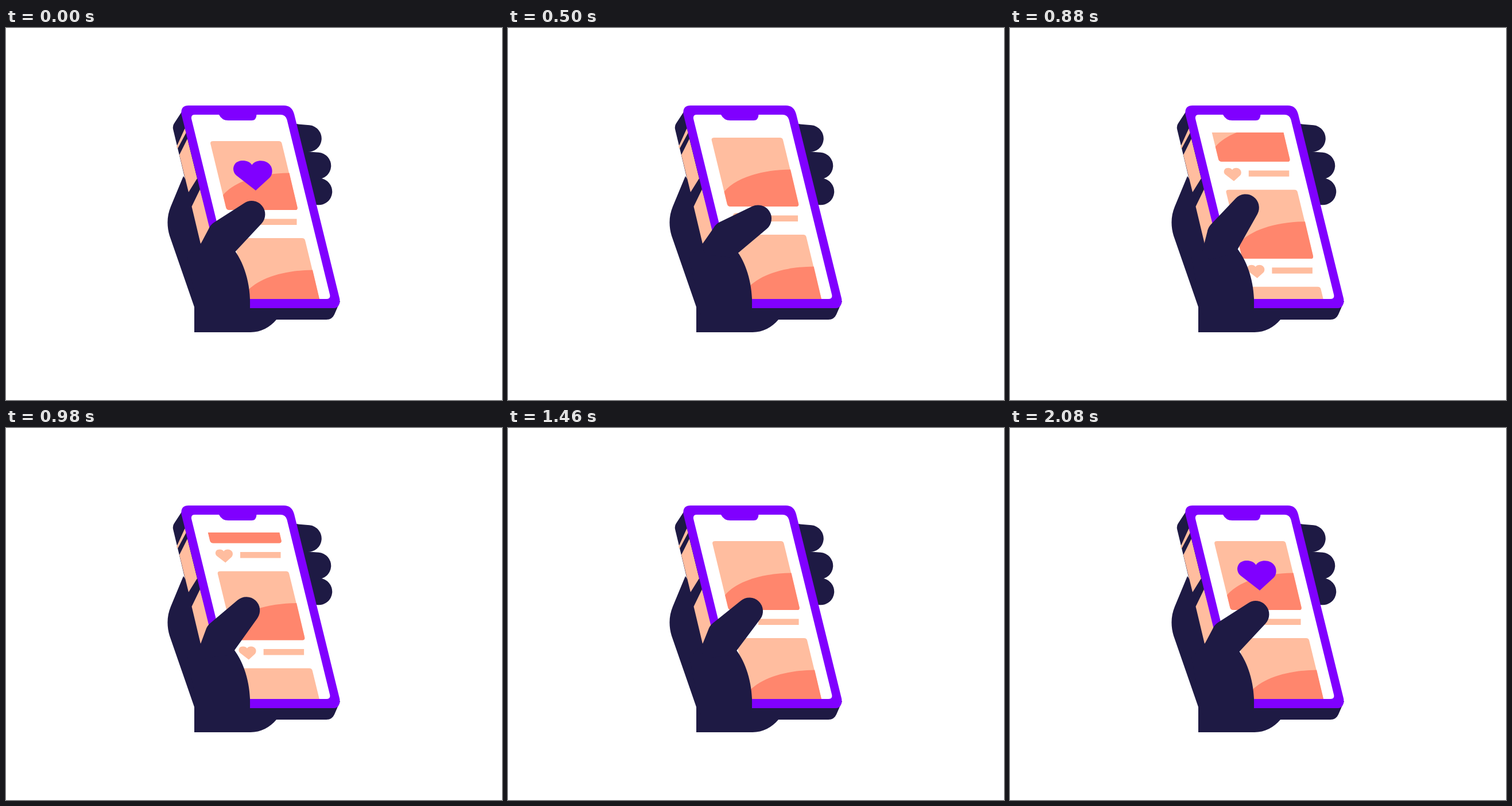
An HTML page for the animation above (2.78 s loop, 864 by 648 pixels).

```html
<!DOCTYPE html>
<html lang="en">
<head>
<meta charset="utf-8">
<title>Scrolling a feed</title>
<style>
  html, body { margin: 0; width: 100%; height: 100%; overflow: hidden; background: #fff; }
  svg { display: block; width: 100vw; height: 100vh; }
  .navy { fill: #1e1a44; }
  .violet { fill: #8000ff; }
  .peach { fill: #ffbd9f; }
  .coral { fill: #ff866d; }
</style>
</head>
<body>
<svg viewBox="0 0 864 648">
  <defs>
    <clipPath id="view"><path d="M320 182H600V472H320Z"/></clipPath>
    <!-- heart centred on the origin -->
    <path id="heart" d="M-1.5-18.500C-8-28-25-28-31-20.500C-36-13.500-34.500-5-28.500 0L5 26L29 4C34.500-1 35-11 31-17C25-28 5-29-1.500-18.500Z"/>
    <g id="post">
      <path class="peach" d="M361 197H475Q479.500 197 480.500 201L507.500 312Q508.500 317 504 317H389Q384.500 317 383.300 313L356.300 202Q355 197 361 197Z"/>
      <path class="coral" d="M378 291C398 267 443 253 493.500 252.500L507.500 312Q508.500 317 504 317H389Q384.500 317 383.300 313Z"/>
      <use href="#heart" class="peach" transform="translate(408 339.500) scale(.445)"/>
      <path class="peach" d="M436 332.500H506.500V343H436Z"/>
    </g>
  </defs>

  <!-- fingers and back of the hand -->
  <path d="M500 190L526.500 192.500M500 237L543 240M510 282L545 285" stroke="#1e1a44" stroke-width="46.500" stroke-linecap="round"/>
  <path class="navy" d="M309 258L287 311C280 328 280 345 285 362L328 486V530H426C444 530 460 521 471 508L480 480L400 400Z"/>

  <!-- phone -->
  <path class="navy" d="M312 137L293 166Q290 170 291 176L339 376L357 350Z"/>
  <path class="peach" d="M311.500 175L297 207L299 210L314 182ZM316 193L302 221L318 286L333 262ZM338 281L323.500 311L339 376L357 352Z"/>
  <path class="navy" d="M582 476L572 499Q568 508 558 508H400V480Z"/>
  <path class="violet" d="M318 135H484Q498 135 502 150L581 471Q582.500 478 579.500 483Q577 488 571 488H389L305.500 150Q304 135 318 135Z"/>
  <path fill="#fff" d="M329 151H371Q376 161 387 161H428Q436 161 436.500 151H478Q487 151 489.500 160L564 464Q566 472 558 472H400L323 158Q322 151 329 151Z"/>

  <g clip-path="url(#view)">
    <g id="feed">
      <use href="#post"/>
      <use href="#post" x="40.600" y="169"/>
      <use href="#post" x="81.200" y="338"/>
    </g>
  </g>
  <use id="like" href="#heart" class="violet"/>

  <!-- palm and thumb -->
  <path class="navy" d="M339 376L394 382C414 406 427 445 425 488V500H336L316 400Z"/>
  <path id="thumb" class="navy" d="M335 384L353 350Q356 343 362 339L415.100 304.900A23.500 23.500 0 0 1 445.300 340.400L400 389L392 398H345Z"/>
</svg>
<script>
const LOOP = 2780, POST = 169, SLANT = 0.24;
const [feed, like, thumb] = ["feed", "like", "thumb"].map(id => document.getElementById(id));

// [time in ms, value]
const thumbTurn = [[0, 0], [400, 8.2], [470, 8.2], [700, -20.3], [1160, -0.8], [1500, -6.2], [1770, 5], [2080, 0]];
const likeSize = [[0, 1], [300, 0], [1700, 0], [1900, 1.24], [2080, 1]];

const smooth = x => x * x * (3 - 2 * x);

function valueAt(keys, t) {
  const i = keys.findIndex(k => k[0] > t);
  if (i < 0) return keys[keys.length - 1][1];
  const [t0, a] = keys[i - 1], [t1, b] = keys[i];
  return a + (b - a) * smooth((t - t0) / (t1 - t0));
}

// cubic-bezier(.57, 0, .446, 1), solved by bisection
function swipe(x) {
  if (x <= 0 || x >= 1) return x <= 0 ? 0 : 1;
  let lo = 0, hi = 1;
  for (let i = 0; i < 24; i++) {
    const u = (lo + hi) / 2, v = 1 - u;
    if (3 * 0.57 * u * v * v + 3 * 0.446 * u * u * v + u * u * u < x) lo = u;
    else hi = u;
  }
  return smooth(lo);
}

function draw(now) {
  const t = now % LOOP;
  const y = -POST * swipe((t - 308) / 1132);
  feed.setAttribute("transform", `translate(${y * SLANT} ${y})`);
  like.setAttribute("transform", `translate(430 257) scale(${valueAt(likeSize, t)})`);
  thumb.setAttribute("transform", `rotate(${valueAt(thumbTurn, t)} 370.5 392)`);
}

let start;
function tick(now) {
  start ??= now;
  draw(now - start);
  requestAnimationFrame(tick);
}
draw(0);
requestAnimationFrame(tick);
</script>
</body>
</html>
```
